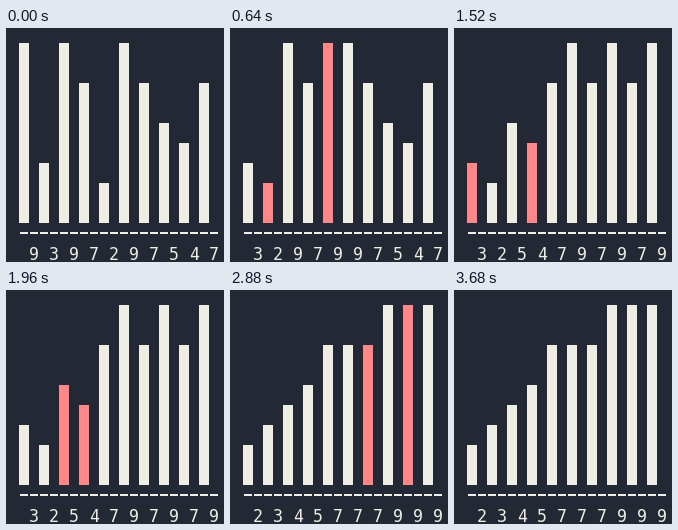
A matplotlib script for the animation above (3.72 s loop, 218 px wide and 234 px high).

```python
import math

import matplotlib.pyplot as plt
from matplotlib.animation import FuncAnimation
from matplotlib.patches import Rectangle

W, H, DPI = 218, 234, 64
FRAMES, INTERVAL = 93, 40
STEP, DELAY = 2.64, 0.1  # frames per sorting step, wait before the first

BACK, PLAIN, ACTIVE = "#232934", "#efeee4", "#ff8787"
CELL, LEFT, FLOOR = 10, 13, 195
VALUES = [9, 3, 9, 7, 2, 9, 7, 5, 4, 7]


def quicksort(a, lo, hi):
    """Yield the highlighted pair after each comparison and swap."""
    if lo >= hi:
        return
    i = lo
    for j in range(lo, hi):
        yield j, hi
        if a[j] < a[hi]:
            a[i], a[j] = a[j], a[i]
            yield i, j
            i += 1
    a[i], a[hi] = a[hi], a[i]
    yield i, hi
    yield from quicksort(a, lo, i - 1)
    yield from quicksort(a, i + 1, hi)


def record(values):
    a = list(values)
    states = [(list(a), ())]
    for pair in quicksort(a, 0, len(a) - 1):
        states.append((list(a), pair))
    states.append((list(a), ()))
    return states


STATES = record(VALUES)

fig = plt.figure(figsize=(W / DPI, H / DPI), dpi=DPI, facecolor=BACK)
ax = fig.add_axes([0, 0, 1, 1])
ax.set_xlim(0, W)
ax.set_ylim(H, 0)
ax.axis("off")


def box(x, y, w, h, smooth=False):
    return ax.add_patch(Rectangle((x, y), w, h, fc=PLAIN, lw=0, aa=smooth))


bars, labels = [], []
for k in range(len(VALUES)):
    x = LEFT + 2 * CELL * k
    bars.append(box(x, FLOOR, CELL, 0))
    labels.append(ax.text(x + 1.5 * CELL, 232, "", color=PLAIN,
                          family="DejaVu Sans Mono", size=16.6 * 72 / DPI,
                          ha="center", va="baseline"))
for k in range(2 * len(VALUES)):
    box(LEFT + CELL * k + 0.8, 204.3, CELL - 1.6, 1.8, smooth=True)


def update(frame):
    n = math.floor((frame - DELAY) / STEP) + 1
    values, pair = STATES[min(n, len(STATES) - 1)]
    for k, v in enumerate(values):
        bars[k].set_y(FLOOR - 2 * CELL * v)
        bars[k].set_height(2 * CELL * v)
        bars[k].set_facecolor(ACTIVE if k in pair else PLAIN)
        labels[k].set_text(str(v))
    return bars + labels


anim = FuncAnimation(fig, update, frames=FRAMES, interval=INTERVAL,
                     init_func=lambda: update(0), repeat=True, repeat_delay=0)
plt.show()
```
